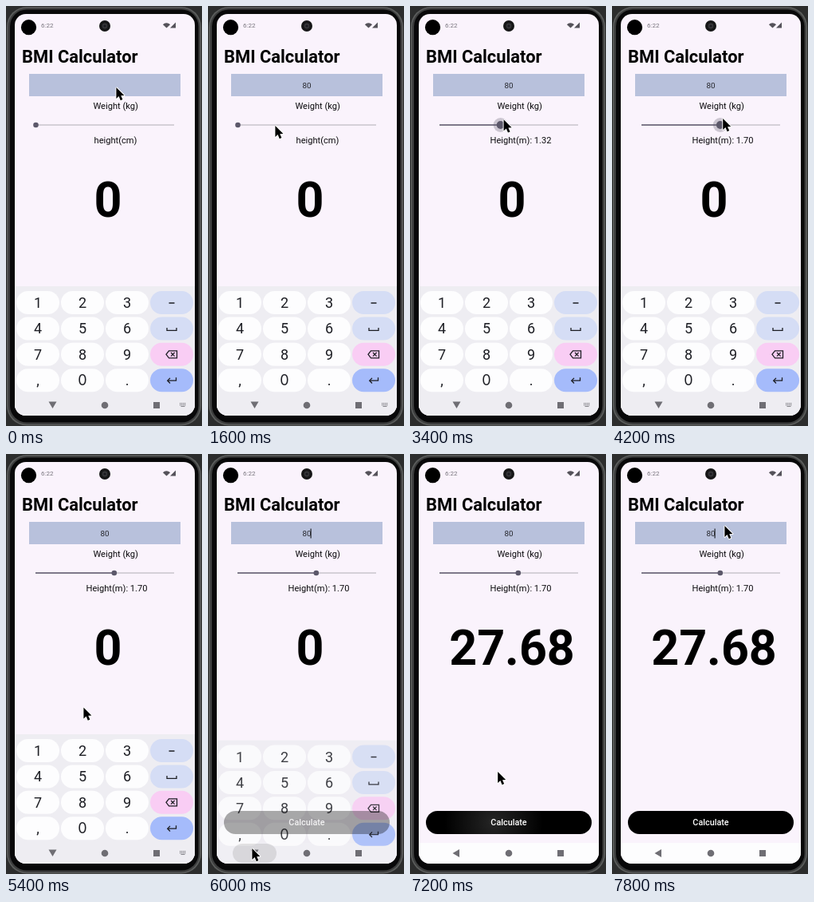
Write an HTML page with a canvas that moves like this. It is 246 by 526 pixels and loops after 8 s.

```html
<!DOCTYPE html>
<html lang="en">
<head>
<meta charset="utf-8">
<title>BMI Calculator</title>
<style>
html, body { margin: 0; width: 100%; height: 100%; overflow: hidden; background: #222; }
canvas { display: block; width: 246px; height: 526px; }
</style>
</head>
<body>
<canvas id="stage"></canvas>
<script>
const W = 246, H = 526, LOOP = 8000, STEP = 200;
const canvas = document.getElementById('stage');
const dpr = window.devicePixelRatio || 1;
canvas.width = W * dpr;
canvas.height = H * dpr;
const ctx = canvas.getContext('2d');
const SANS = 'Roboto, sans-serif';

// Places the pointer travels between
const STOPS = [
  { t: 0, x: 138, y: 101 },
  { t: 800, x: 98, y: 437 },
  { t: 1000, x: 98, y: 468 },
  { t: 1600, x: 84, y: 149 },
  { t: 2000, x: 43, y: 146 },
  { t: 4800, x: 139, y: 140 },
  { t: 6000, x: 55, y: 493 },
  { t: 6600, x: 104, y: 454 },
  { t: 7000, x: 104, y: 454 },
  { t: 7800, x: 141, y: 89 }
];

const progress = (t, from, to) => Math.min(1, Math.max(0, (t - from) / (to - from)));
const smooth = p => p * p * (3 - 2 * p);
const mix = (a, b, p) => a + (b - a) * p;

const isDragging = t => t >= 2000 && t < 4800;
const dragged = t => smooth(progress(t, 2050, 4000));
const metres = t => 1.7 * dragged(t);
const thumbX = t => 37.5 + metres(t) / 3 * 173.5;
const hiding = t => progress(t, 5800, 6400);

function pointerAt(t) {
  if (isDragging(t)) {
    const p = dragged(t);
    return [thumbX(t) + mix(5.5, 3, p), mix(146, 140, p)];
  }
  const i = STOPS.findIndex(s => s.t >= t);
  const b = STOPS[i], a = STOPS[Math.max(0, i - 1)];
  const p = a === b ? 0 : smooth(progress(t, a.t, b.t));
  return [mix(a.x, b.x, p), mix(a.y, b.y, p)];
}

function box(x, y, w, h, r, fill) {
  ctx.beginPath();
  ctx.roundRect(x, y, w, h, r);
  ctx.fillStyle = fill;
  ctx.fill();
}

function disc(x, y, r, fill) {
  ctx.beginPath();
  ctx.arc(x, y, r, 0, Math.PI * 2);
  ctx.fillStyle = fill;
  ctx.fill();
}

function poly(points, fill) {
  ctx.beginPath();
  points.forEach(([x, y]) => ctx.lineTo(x, y));
  ctx.closePath();
  ctx.fillStyle = fill;
  ctx.fill();
}

function line(points, color, width) {
  ctx.beginPath();
  points.forEach(([x, y]) => ctx.lineTo(x, y));
  ctx.strokeStyle = color;
  ctx.lineWidth = width;
  ctx.stroke();
}

function text(str, x, y, size, color = '#0c0b0e', weight = 400, align = 'center', family = SANS) {
  ctx.font = `${weight} ${size}px ${family}`;
  ctx.textAlign = align;
  ctx.fillStyle = color;
  ctx.fillText(str, x, y);
}

function drawPhone() {
  ctx.fillStyle = '#2c2d2d';
  ctx.fillRect(0, 0, W, H);
  box(1, 1, 244, 524.5, 25, '#5c5e5d');
  box(2.5, 2.5, 241, 521.5, 24, '#3c3d3d');
  box(5, 4.5, 236.5, 517, 21, '#080809');
}

function drawStatus() {
  disc(28.5, 26.7, 9.6, '#000');
  text('6:22', 44, 27.3, 8, '#77747c', 400, 'left');
  disc(124, 25, 7, '#161617');
  disc(124, 25, 3.4, '#343437');
  disc(124, 25, 1.6, '#1b1b20');
  const ink = '#55525a';
  ctx.beginPath();
  ctx.moveTo(201.5, 27.5);
  ctx.arc(201.5, 27.5, 6.3, -Math.PI * 0.76, -Math.PI * 0.24);
  ctx.fillStyle = ink;
  ctx.fill();
  poly([[206, 27.5], [213, 27.5], [213, 20.5]], ink);
}

function drawSlider(t) {
  const x = thumbX(t), y = 149, held = isDragging(t);
  line([[37, y], [211, y]], '#c9c5cd', 1.5);
  line([[37, y], [x, y]], '#625d70', 1.5);
  if (held) disc(x, y, 9, 'rgba(80,76,95,.27)');
  disc(x, y, held ? 4.9 : 3.3, '#5c586a');
  const moved = metres(t) > 0;
  text(moved ? 'Height(m): ' + metres(t).toFixed(2) : 'height(cm)', moved ? 139 : 137.5, 172, 11.1);
}

function drawField(t) {
  ctx.fillStyle = '#b8c1dc';
  ctx.fillRect(29, 85, 190, 28);
  const typed = '80'.slice(0, Math.max(0, Math.floor((t - 600) / 200)));
  text(typed, 124, 103, 9.8, '#25262c');
  const caretOn = t >= 600 && (t + 300) % 1000 < 500;
  if (caretOn) line([[123.5 + typed.length * 2.8, 93.5], [123.5 + typed.length * 2.8, 105.5]], '#15161a', 1.1);
}

function drawApp(t) {
  ctx.fillStyle = '#faf3fc';
  ctx.fillRect(11, 10, 226, 503);
  drawStatus();
  text('BMI Calculator', 20, 71, 21.9, '#000', 700, 'left');
  drawField(t);
  text('Weight (kg)', 137.6, 129, 11.1);
  drawSlider(t);
  text(t < 6800 ? '0' : '27.68', 128, 263.5, 61, '#000', 700);
  ctx.fillStyle = '#fdfdfe';
  ctx.fillRect(11, 487, 226, 26);
}

function drawButton(t) {
  ctx.save();
  ctx.globalAlpha = hiding(t);
  box(20, 447, 208, 29, 14.5, '#000');
  const glow = 0.42 * Math.max(0, 1 - Math.abs(t - 6800) / 600);
  const light = ctx.createRadialGradient(105, 461, 2, 105, 461, 62);
  light.addColorStop(0, `rgba(255,255,255,${glow})`);
  light.addColorStop(1, 'rgba(255,255,255,0)');
  box(20, 447, 208, 29, 14.5, light);
  ctx.globalAlpha = Math.min(1, hiding(t) * 2.6);
  text('Calculate', 124, 465.3, 10.8, '#fff', 500);
  ctx.restore();
}

const ICONS = {
  minus: [[[-3.5, 0.5], [3.5, 0.5]]],
  space: [[[-6, -1], [-6, 2.5], [6, 2.5], [6, -1]]],
  erase: [
    [[-7, 0], [-3.5, -4.5], [6.5, -4.5], [6.5, 4.5], [-3.5, 4.5], [-7, 0], [-3.5, -4.5]],
    [[-1, -2.3], [3.6, 2.3]],
    [[-1, 2.3], [3.6, -2.3]]
  ],
  enter: [[[5.5, -3.5], [5.5, 0.5], [-5, 0.5]], [[-2, -2.8], [-5.3, 0.5], [-2, 3.8]]]
};
const ROWS = [
  { keys: '123', icon: 'minus', tint: '#d5ddf5' },
  { keys: '456', icon: 'space', tint: '#d5ddf5' },
  { keys: '789', icon: 'erase', tint: '#f9cdf4' },
  { keys: ',0.', icon: 'enter', tint: '#a5bbfb' }
];

function drawKeyboard(t) {
  const gone = hiding(t), ink = '#1d1e24';
  ctx.save();
  ctx.globalAlpha = Math.max(0, 1 - 1.35 * gone * gone);
  ctx.translate(0, 22.5 * gone);
  ctx.fillStyle = '#eeedf2';
  ctx.fillRect(11, 351, 226, 162);
  ROWS.forEach(({ keys, icon, tint }, r) => {
    const y = 371.5 + r * 32.4;
    [...keys].forEach((ch, c) => {
      const x = 40 + c * 56;
      box(x - 27, y - 14.5, 54, 29, 14.5, '#fdfdfe');
      text(ch, x, y + 6.5, 18, ink, 400, 'center', ch === '0' ? 'Inter, sans-serif' : SANS);
    });
    box(181, y - 14.5, 54, 29, 14.5, tint);
    ICONS[icon].forEach(path => line(path.map(([dx, dy]) => [208 + dx, y + dy]), ink, 1.3));
  });
  ctx.restore();
}

function drawNav(t) {
  const ink = '#6f6e74', closing = t >= 6000;
  if (closing) box(31, 488, 55, 24, 12, `rgba(0,0,0,${0.1 * (1 - progress(t, 6000, 6400))})`);
  if (t < 6200) poly([[53.5, 495.5], [63.5, 495.5], [58.5, 504]], ink);
  else poly([[62, 495], [62, 505], [53.5, 500]], ink);
  disc(124, 500, 4.3, ink);
  ctx.fillStyle = ink;
  ctx.fillRect(185, 496, 8, 8);
  if (closing) return;
  ctx.fillStyle = '#85848a';
  for (let i = 0; i < 8; i++) ctx.fillRect(218 + i % 4 * 2, 497 + (i >> 2) * 2, 1.3, 1.3);
  ctx.fillRect(219.5, 501, 5, 1);
}

function drawPointer(t) {
  const [px, py] = pointerAt(t);
  const arrow = [[0, 0], [0, 14], [3.2, 11.1], [5.4, 16.2], [8, 15.1], [5.8, 10.2], [10, 10]];
  ctx.save();
  ctx.translate(px + 0.4, py + 1);
  ctx.lineJoin = 'round';
  line([...arrow, arrow[0]], '#fff', 1.9);
  poly(arrow, '#000');
  ctx.restore();
}

function render(t) {
  ctx.setTransform(dpr, 0, 0, dpr, 0, 0);
  drawPhone();
  ctx.save();
  ctx.beginPath();
  ctx.roundRect(11, 10, 226, 503, 14);
  ctx.clip();
  drawApp(t);
  drawKeyboard(t);
  drawButton(t);
  drawNav(t);
  ctx.restore();
  drawPointer(t);
}

const start = performance.now();
function tick() {
  const t = (performance.now() - start) % LOOP;
  render(Math.floor(t / STEP) * STEP);
  requestAnimationFrame(tick);
}
tick();
</script>
</body>
</html>
```
